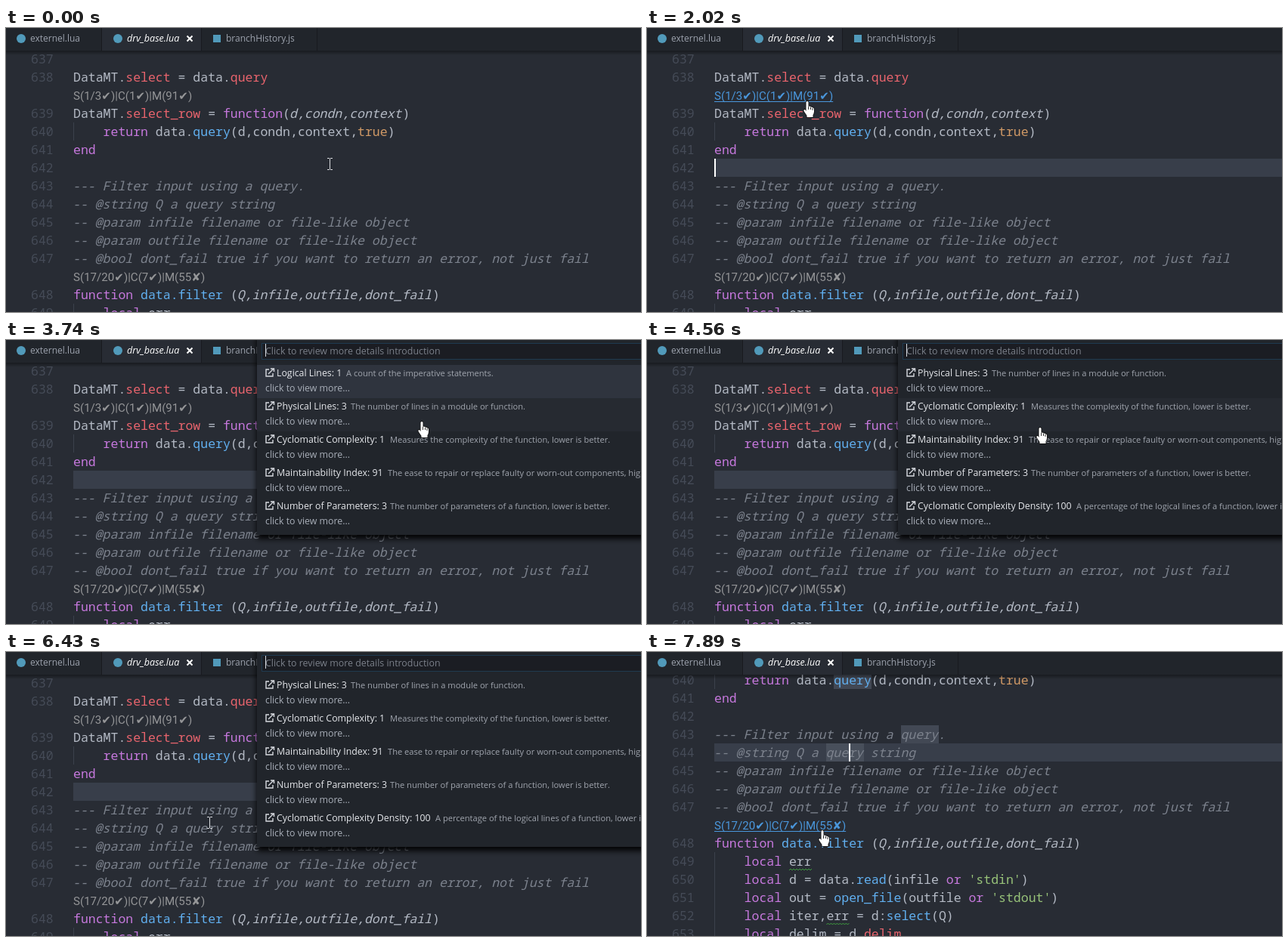
An HTML page with a canvas that plays this animation: 840 by 376 pixels, repeating every 8 s.

```html
<!DOCTYPE html>
<html lang="en">
<head>
<meta charset="utf-8">
<title>Code metrics in an editor</title>
<style>
  html, body { margin: 0; width: 100%; height: 100%; overflow: hidden; background: #282c34; }
  canvas { display: block; }
</style>
</head>
<body>
<canvas id="stage" width="840" height="376"></canvas>
<script>
const ctx = document.getElementById('stage').getContext('2d');
const LOOP = 8000, LEFT = 89, CHAR = 9.896, ROW = 24;
const MONO = '16.5px "Noto Sans Mono", "DejaVu Sans Mono", monospace';
const LENS = '15.1px Roboto, "DejaVu Sans", sans-serif';
const ui = size => `${size}px "Open Sans", "Noto Sans", "DejaVu Sans", sans-serif`;

const COLORS = {
  t: '#b4bac5', i: '#b4bac5', r: '#e8646d', p: '#c678dd',
  b: '#61afef', o: '#d19a66', g: '#98c379', c: '#7c828d'
};

// {key:text} colours a span; keys i and c are also italic
const LINES = [
  [637, ''],
  [638, 'DataMT.{r:select} = data.{r:query}'],
  ['lens', 'S(1/3✔)|C(1✔)|M(91✔)'],
  [639, 'DataMT.{r:select_row} = {p:function}({i:d,condn,context})'],
  [640, '    {p:return} data.{b:query}(d,condn,context,{o:true})'],
  [641, '{p:end}'],
  [642, ''],
  [643, '{c:--- Filter input using a query.}'],
  [644, '{c:-- @string Q a query string}'],
  [645, '{c:-- @param infile filename or file-like object}'],
  [646, '{c:-- @param outfile filename or file-like object}'],
  [647, '{c:-- @bool dont_fail true if you want to return an error, not just fail}'],
  ['lens', 'S(17/20✔)|C(7✔)|M(55✘)'],
  [648, '{p:function} {b:data.filter} ({i:Q,infile,outfile,dont_fail})'],
  [649, '    {p:local} err'],
  [650, "    {p:local} d = data.{b:read}(infile {p:or} {g:'stdin'})"],
  [651, "    {p:local} out = {b:open_file}(outfile {p:or} {g:'stdout'})"],
  [652, '    {p:local} iter,err = d:{b:select}(Q)'],
  [653, '    {p:local} delim = d.{r:delim}']
];

// label, description, x of the description
const METRICS = [
  ['Logical Lines: 1', 'A count of the imperative statements.', 450],
  ['Physical Lines: 3', 'The number of lines in a module or function.', 456],
  ['Cyclomatic Complexity: 1', 'Measures the complexity of the function, lower is better.', 508],
  ['Maintainability Index: 91', 'The ease to repair or replace faulty or worn-out components, higher is better.', 505],
  ['Number of Parameters: 3', 'The number of parameters of a function, lower is better.', 508],
  ['Cyclomatic Complexity Density: 100', 'A percentage of the logical lines of a function, lower is better.', 568]
];

// start, end, number of steps, destination
const MOVES = [
  [1050, 1050, 1, 342, 165],
  [1190, 1740, 5, 213, 96],
  [3320, 3740, 4, 551, 107],
  [4440, 4560, 2, 521, 115],
  [5770, 6430, 6, 269, 226],
  [6860, 6860, 1, 269, 251],
  [7240, 7620, 3, 255, 254],
  [7770, 7770, 1, 238, 240],
  [7890, 7890, 1, 233, 235]
];

const HAND = new Path2D('M-1.5 1Q0 -1 1.5 1V7Q3 6 4.5 7.5Q6 7 7 8.5Q9 8 9 10.5V14Q8.5 17 7.5 18V21H-.5V19L-4.5 13Q-5 10.5 -3 11L-1.5 13Z');

function rect(color, x, y, w, h) {
  ctx.fillStyle = color;
  ctx.fillRect(x, y, w, h);
}

function text(str, x, y, font, color) {
  ctx.font = font;
  ctx.fillStyle = color;
  ctx.fillText(str, x, y);
}

function stroke(color, width, ...lines) {
  ctx.strokeStyle = color;
  ctx.lineWidth = width;
  ctx.beginPath();
  for (const points of lines)
    points.forEach(([x, y], i) => i ? ctx.lineTo(x, y) : ctx.moveTo(x, y));
  ctx.stroke();
}

function monoText(str, x, y, color, italic) {
  const font = (italic ? 'italic ' : '') + MONO;
  const left = italic ? x - 1 : x; // slanted glyphs lean out of their cell
  [...str].forEach((ch, i) => text(ch, left + i * CHAR, y, font, color));
}

function mouseAt(t) {
  let x = 428, y = 180;
  for (const [start, end, steps, toX, toY] of MOVES) {
    if (t < start) break;
    const done = t >= end ? 1 : (1 + Math.floor((t - start) / (end - start) * (steps - 1))) / steps;
    x += (toX - x) * done;
    y += (toY - y) * done;
  }
  return { x: Math.round(x), y: Math.round(y) };
}

const blinkOn = (t, start) => Math.floor((t - start) / 500) % 2 === 0;

function stateAt(t) {
  const clicked = t >= 6710;
  return {
    mouse: mouseAt(t),
    popup: t >= 2480 && !clicked,
    scroll: t < 6980 ? 0 : t < 7100 ? 50 : 100,
    listTop: t < 4020 || (t >= 4840 && t < 5250) ? 0 : 1,
    activeLine: t < 120 ? 0 : clicked ? 644 : 642,
    caretCol: clicked ? 18 : 0,
    caret: blinkOn(t, clicked ? 6620 : -20),
    popupCaret: blinkOn(t, 2410),
    marks: t >= 6860
  };
}

function drawSquiggle(col, y) {
  const x = LEFT + col * CHAR;
  const points = Array.from({ length: 16 }, (_, i) => [x + i * 2, y + (i % 2 ? -1 : 1)]);
  stroke('#3fa03f', 1, points);
}

function drawLens(label, y, hovered) {
  const color = hovered ? '#4a97dc' : '#959698';
  text(label, LEFT, y + 6, LENS, color);
  if (hovered) rect(color, LEFT, y + 8, ctx.measureText(label).width, 1);
}

function drawLine(number, source, y, s) {
  const parts = source.split(/\{(\w):([^}]*)\}/);
  const plain = source.replace(/\{\w:([^}]*)\}/g, '$1');
  const top = y - ROW / 2;
  const active = number === s.activeLine;

  if (active) rect('#383e4a', LEFT, top, 840 - LEFT, ROW);
  const word = plain.indexOf('query');
  if (s.marks && word >= 0)
    rect(active ? '#484f5b' : '#424854', LEFT + Math.round(word * CHAR), top, 50, ROW);
  if (plain.startsWith('    ')) rect('#3c414b', LEFT, top, 1, ROW);

  monoText(String(number), 33, y + 6, '#454b57');

  let x = LEFT;
  for (let i = 0; i < parts.length; i += 3) {
    // each plain stretch is preceded by a coloured one
    const spans = i ? [[parts[i - 2], parts[i - 1]], ['t', parts[i]]] : [['t', parts[i]]];
    for (const [key, str] of spans) {
      monoText(str, x, y + 6, COLORS[key], key === 'i' || key === 'c');
      x += str.length * CHAR;
    }
  }

  const err = plain.indexOf('err');
  if (number > 648 && err >= 0) drawSquiggle(err, y + 11);
  if (active && s.caret && !s.popup)
    rect('#fff', LEFT + Math.round(s.caretCol * CHAR), top, 2, ROW);
}

function drawEditor(s) {
  rect('#282c34', 0, 0, 840, 376);
  let lensHovered = false;
  LINES.forEach(([number, source], row) => {
    const y = 41 + row * ROW - s.scroll;
    if (number !== 'lens') return drawLine(number, source, y, s);
    const over = s.mouse.x < 264 && Math.abs(s.mouse.y - y) < 12;
    lensHovered ||= over;
    drawLens(source, y, over);
  });
  const shade = ctx.createLinearGradient(0, 30, 0, 36);
  shade.addColorStop(0, 'rgba(0,0,0,.4)');
  shade.addColorStop(1, 'rgba(0,0,0,0)');
  rect(shade, 0, 30, 840, 6);
  return lensHovered;
}

function drawTabs() {
  rect('#21252b', 0, 0, 840, 30);
  rect('#282c34', 127, 0, 131, 30);
  for (const x of [126, 258, 411]) rect('#181a1f', x, 0, 1, 30);
  for (const x of [20, 148]) {
    ctx.fillStyle = '#519aba';
    ctx.beginPath();
    ctx.arc(x, 14, 6, 0, 7);
    ctx.fill();
  }
  rect('#519aba', 274, 9, 10, 10);
  text('externel.lua', 32, 18, ui(12), '#9da3ae');
  text('drv_base.lua', 160, 18, 'italic ' + ui(12.5), '#fff');
  text('branchHistory.js', 291, 18, ui(12), '#9da3ae');
  stroke('#fff', 2, [[239.5, 10.5], [246.5, 17.5]], [[246.5, 10.5], [239.5, 17.5]]);
}

function drawLinkIcon(x, y) {
  stroke('#d7dae0', 1.4,
    [[x + 5, y + 2], [x + 1, y + 2], [x + 1, y + 11], [x + 10, y + 11], [x + 10, y + 7]],
    [[x + 4, y + 8], [x + 11, y + 1]],
    [[x + 7, y + 1], [x + 11.5, y + 1], [x + 11.5, y + 5]]);
}

function drawPopup(s) {
  ctx.save();
  ctx.shadowColor = '#000';
  ctx.shadowBlur = 8;
  ctx.shadowOffsetY = 5;
  rect('#21252b', 332, -10, 520, 268);
  ctx.restore();

  rect('#1f3a50', 338, 4, 510, 22);
  rect('#1b1d23', 339, 5, 510, 20);
  text('Click to review more details introduction', 343, 19, ui(12.4), '#7b808a');
  if (s.popupCaret) rect('#d7dae0', 343, 5, 1, 17);

  for (let row = 0; row < 5; row++) {
    const top = 33 + row * 44, index = row + s.listTop;
    const [label, description, x] = METRICS[index];
    const hovered = s.mouse.x > 332 && s.mouse.y >= top && s.mouse.y < top + 44;
    if (index === 0) rect('#2f343e', 332, top, 508, 44);
    else if (hovered) rect('#262a31', 332, top, 508, 44);
    drawLinkIcon(343, top + 4);
    text(label, 358, top + 15, ui(12.35), '#e6e8ec');
    text(description, x, top + 15, ui(11.12), '#a0a5ae');
    text('click to view more...', 343, top + 35, ui(12.35), '#a9afb9');
  }
}

function drawMouse({ x, y }, hand) {
  if (hand) {
    ctx.save();
    ctx.translate(x - 1, y + 1);
    ctx.strokeStyle = '#111';
    ctx.lineWidth = 1.6;
    ctx.stroke(HAND);
    ctx.fillStyle = '#fff';
    ctx.fill(HAND);
    // gaps between the curled fingers
    stroke('#333', 1, [[1.5, 7], [1.5, 11]], [[4.5, 8], [4.5, 11]], [[7, 9], [7, 12]]);
    ctx.restore();
    return;
  }
  rect('#d8dade', x, y - 7, 1, 14);
  for (const edge of [y - 8, y + 7]) {
    rect('#d8dade', x - 3, edge, 3, 1);
    rect('#d8dade', x + 1, edge, 3, 1);
  }
}

function frame(now) {
  const s = stateAt(now % LOOP);
  const onLens = drawEditor(s);
  drawTabs();
  if (s.popup) drawPopup(s);
  const onPopup = s.popup && s.mouse.x > 332 && s.mouse.y < 258;
  drawMouse(s.mouse, onLens || onPopup);
  requestAnimationFrame(frame);
}
requestAnimationFrame(frame);
</script>
</body>
</html>
```
